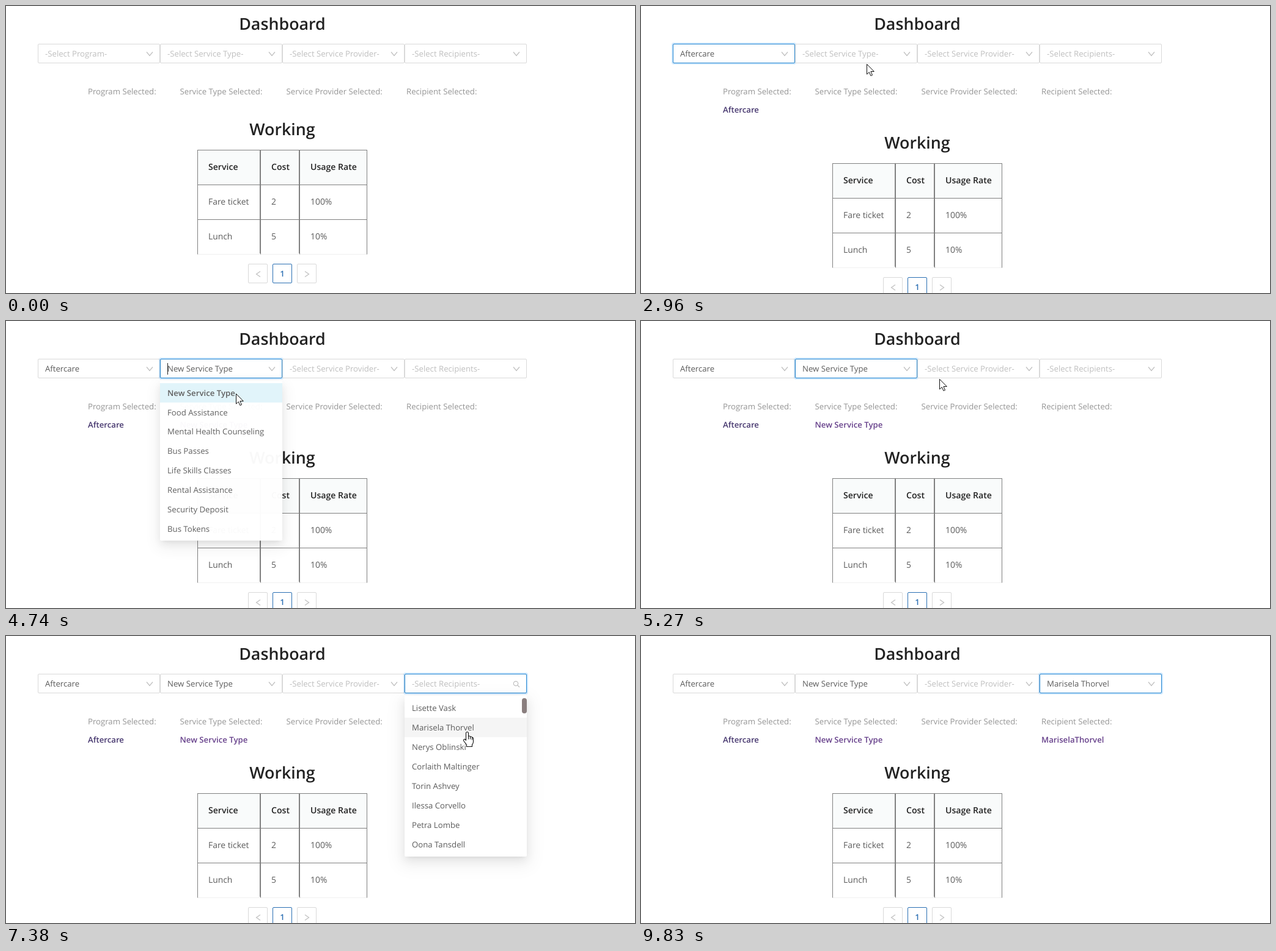
These frames come from a looping animation (1029 px wide and 471 px high, 9900 ms). An HTML page:

```html
<!DOCTYPE html>
<html lang="en">
<head>
<meta charset="utf-8">
<title>Dashboard</title>
<style>
html, body { margin: 0; width: 100%; height: 100%; overflow: hidden; background: #fff; }
body { position: relative; font: 13.2px/32px "Open Sans", "Noto Sans", sans-serif; color: #5c5c5c; text-rendering: geometricPrecision; }
div, svg { position: absolute; box-sizing: border-box; white-space: nowrap; }
svg { overflow: visible; fill: none; }
.title { left: 52px; width: 800px; text-align: center; font-size: 26.8px; font-weight: 600; color: #222; }
.select { top: 62px; width: 200px; height: 32px; border: 1px solid #d9d9d9; border-radius: 2px; background: #fff; }
.ring { inset: -1px; border: 1px solid #2486cf; border-radius: 2px; box-shadow: 0 0 0 2px rgba(24,144,255,.2); }
.text { left: 11px; top: -1px; }
.caret { left: 11px; top: 6px; width: 1px; height: 19px; background: #222; }
.icon { left: 176px; top: 10px; stroke: #bfbfbf; stroke-width: 1.2; }
.label { top: 124px; color: #959595; }
.value { top: 154px; font-weight: 600; color: #67418b; }
.cell { border: 1px solid #808080; border-bottom-color: #f0f0f0; height: 58px; line-height: 56px; padding-left: 17px; font-size: 13.9px; }
.head { background: #f9fbfb; font-size: 14.1px; font-weight: 600; color: #222; }
.page { width: 32px; height: 32px; border: 1px solid #d9d9d9; border-radius: 2px; text-align: center; line-height: 30px; }
.page svg { left: 11px; top: 11px; stroke: #bfbfbf; stroke-width: 1.2; }
.active { border-color: #2a6fb3; color: #2a6fb3; font-weight: 600; }
.menu { top: 98px; width: 200px; background: #fff; border-radius: 2px; transform-origin: 0 0;
  box-shadow: 0 3px 6px -4px rgba(0,0,0,.12), 0 6px 16px rgba(0,0,0,.08), 0 9px 28px 8px rgba(0,0,0,.05); }
.item { left: 0; width: 200px; height: 32px; padding-left: 12px; }
.hover { background: #f5f5f5; }
.chosen { background: #e1f4fa; font-weight: 600; }
.thumb { left: 192px; top: 4px; width: 8px; height: 25px; border-radius: 4px; background: #8a7e7e; }
.empty { left: 0; width: 200px; top: 55px; text-align: center; color: #bfbfbf; }
</style>
</head>
<body>
<script>
const LOOP = 9900, BLINK = 530;

const selects = [
  { x: 52, hint: '-Select Program-', label: 'Program Selected:', labelX: 134, pick: 0,
    open: 850, close: 1975, blur: 3160, items: ['Aftercare', 'Sheltering', 'Prevention'] },
  { x: 252, hint: '-Select Service Type-', label: 'Service Type Selected:', labelX: 284.5, pick: 0,
    open: 3160, close: 4680, blur: 5670,
    items: ['New Service Type', 'Food Assistance', 'Mental Health Counseling', 'Bus Passes',
      'Life Skills Classes', 'Rental Assistance', 'Security Deposit', 'Bus Tokens'] },
  { x: 452, hint: '-Select Service Provider-', label: 'Service Provider Selected:', labelX: 458.5, pick: -1,
    open: 5670, close: 6520, blur: 6520, items: [] },
  { x: 652, hint: '-Select Recipients-', label: 'Recipient Selected:', labelX: 655, pick: 1,
    open: 6520, close: 7710, blur: 9830, caretReset: 7510,
    items: ['Lisette Vask', 'Marisela Thorvel', 'Nerys Oblinski', 'Corlaith Maltinger',
      'Torin Ashvey', 'Ilessa Corvello', 'Petra Lombe', 'Oona Tansdell'] }
];

// Pointer stops: time, x, y
const stops = [
  [190, 859, 452], [800, 152, 87], [1380, 152, 87], [1580, 148, 112], [2700, 148, 112],
  [2960, 369, 95], [3120, 376, 82], [3260, 376, 84], [3430, 376, 119], [4860, 376, 119],
  [5600, 569, 78], [6230, 569, 78], [6500, 756, 80], [7080, 756, 80], [7380, 754, 157],
  [7520, 757, 160], [8240, 757, 160], [8380, 1004, 158], [8770, 1004, 158], [9080, 992, 381]
];

const chevron = '<path d="M1 2.5l5 6 5-6"/>';
const lens = '<circle cx="5" cy="5" r="3.7"/><path d="M7.7 7.7l3.3 3.3"/>';
const tray = `<svg style="left:73px;top:16px" width="54.6" height="35" viewBox="0 0 64 41">
  <ellipse cx="32" cy="34" rx="32" ry="7" fill="#f5f5f5"/>
  <g stroke="#d9d9d9"><path d="M55 14L45 2Q44 1 43 1H21Q20 1 19 2L9 14V23H55Z"/>
  <path fill="#fafafa" d="M42 17Q42 14 44 14H55V32Q55 36 52 36H12Q9 36 9 32V14H20Q22 14 22 17T25 20H39Q42 20 42 17Z"/></g></svg>`;
const pointers = {
  arrow: '<path d="M0 0V16.5L3.8 13L6.4 19L9 17.9L6.4 12H11.8Z" fill="#fff" stroke="#111"/>',
  beam: '<path d="M-3-8H-1L0-7L1-8H3M-3 8H-1L0 7L1 8H3M0-7V7" stroke="#111" stroke-width="1.3"/>',
  hand: '<path d="M-2 14V2Q-2 0 0 0T2 2V8Q2 6.500 3.500 6.500T5 8.500Q5 7.500 6.500 7.500T8 9.500Q9.500 8.500 10 10.500V16Q10 19 8 21V24H-1V21L-5.500 15Q-6.500 13-5 12T-2 14ZM2 8V12M5 8.500V12M8 9.500V13" fill="#fff" stroke="#111" stroke-width="1.1"/>'
};

function add(parent, className, html = '', style = '') {
  const el = document.createElement('div');
  Object.assign(el, { className, innerHTML: html });
  el.style.cssText = style;
  return parent.appendChild(el);
}
const clamp = v => Math.min(1, Math.max(0, v));
const show = (el, on) => { el.style.visibility = on ? 'visible' : 'hidden'; };

add(document.body, 'title', 'Dashboard', 'top:12.5px');

const working = add(document.body, '', '', 'left:0;top:0');
add(working, 'title', 'Working', 'top:185.5px');
const columns = [[313, 104], [416, 65], [480, 111]];
[['Service', 'Cost', 'Usage Rate'], ['Fare ticket', '2', '100%'], ['Lunch', '5', '10%']].forEach((row, r) =>
  row.forEach((text, c) => add(working, r ? 'cell' : 'cell head', text,
    `left:${columns[c][0]}px;width:${columns[c][1]}px;top:${236 + r * 57}px`)));
// Doubled rules between the columns
[415, 479].forEach(x => add(working, '', '', `left:${x}px;top:236px;width:2px;height:170px;background:#808080`));
[293, 350].forEach(y => add(working, '', '', `left:313px;top:${y}px;width:278px;height:1px;background:#808080`));
const arrowIcon = d => `<svg width="10" height="10"><path d="${d}"/></svg>`;
[arrowIcon('M8 0.500L1.500 5L8 9.500'), '1', arrowIcon('M1 0.500L7.500 5L1 9.500')].forEach((html, i) =>
  add(working, i === 1 ? 'page active' : 'page', html, `left:${396 + i * 40}px;top:423px`));

selects.forEach((s, i) => {
  const box = add(document.body, 'select', '', `left:${s.x}px`);
  s.ring = add(box, 'ring');
  s.text = add(box, 'text');
  s.caret = add(box, 'caret');
  box.insertAdjacentHTML('beforeend', `<svg class="icon" width="12" height="12"><g>${chevron}</g><g>${lens}</g></svg>`);
  [s.chevron, s.lens] = box.querySelectorAll('g');
  add(document.body, 'label', s.label, `left:${s.labelX}px`);
  s.choice = s.items[s.pick];
  s.value = add(document.body, 'value', i === 3 ? s.choice.replace(' ', '') : s.choice || '',
    `left:${s.labelX}px;${i ? '' : 'color:#47386f'}`);
});
selects.forEach((s, i) => {
  const height = s.items.length ? s.items.length * 32 + 8 : 99;
  s.menu = add(document.body, 'menu', '', `left:${s.x}px;height:${height}px`);
  s.rows = s.items.map((name, n) => add(s.menu, 'item', name, `top:${4 + n * 32}px`));
  if (!s.items.length) add(s.menu, 'empty', 'No Data'), s.menu.insertAdjacentHTML('beforeend', tray);
  if (i === 3) add(s.menu, 'thumb');
});
const pointer = add(document.body, '', '<svg width="1" height="1"></svg>', 'left:0;top:0');
const pointerArt = pointer.firstChild;
let pointerKind = '';

function pointerAt(t) {
  const next = stops.findIndex(p => p[0] > t);
  if (next < 1) return (next ? stops[stops.length - 1] : stops[0]).slice(1);
  const a = stops[next - 1], b = stops[next], u = (t - a[0]) / (b[0] - a[0]);
  const k = u * u * (3 - 2 * u);
  return [a[1] + (b[1] - a[1]) * k, a[2] + (b[2] - a[2]) * k];
}

function drawSelect(s, t, y) {
  const isOpen = t >= s.open && t < s.close;
  const focused = t >= s.open && t < s.blur;
  const picked = s.pick >= 0 && t >= s.close;
  s.ring.style.opacity = focused ? clamp((t - s.open) / 200) : t >= s.blur ? 1 - clamp((t - s.blur) / 300) : 0;
  s.text.textContent = picked ? s.choice : s.hint;
  s.text.style.color = picked ? '' : '#bfbfbf';
  const blinkStart = t >= s.caretReset ? s.caretReset : s.open;
  show(s.caret, focused && Math.floor((t - blinkStart) / BLINK) % 2 === 0);
  show(s.chevron, !isOpen);
  show(s.lens, isOpen);
  show(s.value, picked);

  const amount = isOpen ? 1 - (1 - clamp((t - s.open) / 200)) ** 4 : 1 - clamp((t - s.close) / 200) ** 3;
  show(s.menu, t >= s.open && amount > 0);
  s.menu.style.opacity = amount;
  s.menu.style.transform = `scaleY(${0.8 + 0.2 * amount})`;
  const current = Math.max(0, Math.floor((y - 102) / 32));
  s.rows.forEach((row, n) => {
    row.className = picked && n === s.pick ? 'item chosen' : n === current ? 'item hover' : 'item';
  });
}

function draw(t) {
  const [x, y] = pointerAt(t);
  selects.forEach(s => drawSelect(s, t, y));
  working.style.top = t >= selects[0].close ? '22px' : '0';

  const overItem = selects.some(s => s.items.length && t >= s.open && t < s.close && y > 102);
  const overSelect = y >= 62 && y < 94 && x >= 52 && x < 852;
  const kind = overItem ? 'hand' : overSelect ? 'beam' : 'arrow';
  if (kind !== pointerKind) pointerArt.innerHTML = pointers[pointerKind = kind];
  pointer.style.transform = `translate(${Math.round(x) + 0.5}px,${Math.round(y) + 0.5}px)`;
  show(pointer, t >= 190 && t < 9090);
}

const start = performance.now();
function frame() {
  draw((performance.now() - start) % LOOP);
  requestAnimationFrame(frame);
}
frame();
</script>
</body>
</html>
```
